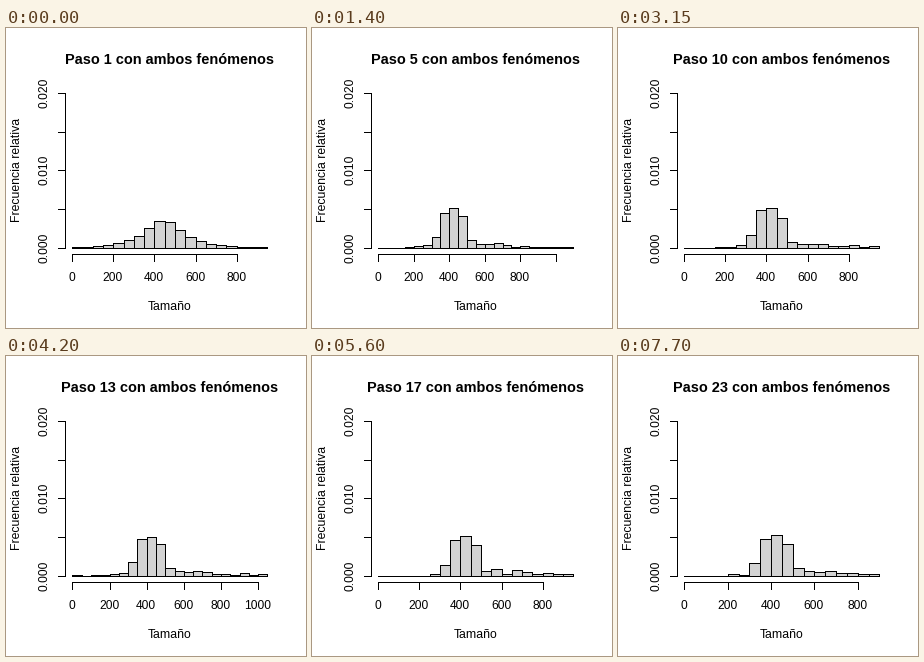
A matplotlib script for the animation above (8000 ms loop, 300x300 px).

```python
import numpy as np
import matplotlib.pyplot as plt
from matplotlib.animation import FuncAnimation
from matplotlib.patches import Rectangle

SIZE, DPI = 300, 100
TICK_MS, LOOP_MS, STEP_MS = 50, 8000, 350
STEPS = 23
PX = 72 / DPI  # one pixel in points

# Plot region, in pixels from the top left
X0, X1 = 66.84, 261.96
Y0, Y1 = 220.35, 65.24
AXIS_X, AXIS_Y, TICK = 59, 226, 7
BIN = 50

# Largest size, held from each step until the next one listed
MAX_SIZE = {1: 950, 2: 900, 4: 950, 5: 1100, 6: 950, 11: 900, 13: 1050,
            14: 950, 15: 1100, 16: 950, 21: 850, 22: 900}


def initial(x):
    return np.maximum(0, 29 / (1 + ((x - 445) / 110) ** 2) - 1)


def settled(x):
    core = 31 / (1 + ((x - 410) / 75) ** 8)
    tail = 9 * np.exp(-np.abs(x - 420) / np.where(x < 420, 100, 300))
    return core + tail


def heights(step, top):
    """Bar heights in pixels: a broad bump that settles to a narrow core."""
    x = np.arange(BIN / 2, top, BIN)
    mix = 1 - np.exp(-(step - 1) / 1.5)
    mean = initial(x) + (settled(x) - initial(x)) * mix
    noise = np.random.default_rng(step).normal(size=len(x))
    h = np.round(mean + mix * noise * np.minimum(1.2, 0.5 * np.sqrt(mean)))
    h[-1] = max(1, h[-1])
    return np.maximum(0, h)


fig = plt.figure(figsize=(SIZE / DPI, SIZE / DPI), dpi=DPI, facecolor="white")
ax = fig.add_axes([0, 0, 1, 1])
ax.set_xlim(0, SIZE)
ax.set_ylim(SIZE, 0)
ax.axis("off")


def line(xs, ys):
    return ax.plot(np.floor(xs), np.floor(ys), color="black", lw=PX,
                   antialiased=False, solid_capstyle="projecting")[0]


def text(x, y, s, size=12, **kw):
    return ax.text(x, y, s, fontsize=size * PX, family="Liberation Sans",
                   ha="center", va="baseline", rotation_mode="anchor", **kw)


def y_axis():
    line([AXIS_X, AXIS_X], [Y0, Y1])
    for i, y in enumerate(np.linspace(Y0, Y1, 5)):
        line([AXIS_X - TICK, AXIS_X], [y, y])
        if i % 2 == 0:
            text(42, y - 0.5, f"{i * 0.005:.3f}", rotation=90)


y_axis()
text(14.5, 142, "Frecuencia relativa", 12.3, rotation=90)
text(163.5, 282, "Tamaño", 12.3)
title = text(163.2, 36, "", 14.5, weight="bold")
parts = []


def draw_step(step):
    top = MAX_SIZE[max(s for s in MAX_SIZE if s <= step)]

    def px(v):
        return X0 + (X1 - X0) * v / top

    edges = np.floor(px(np.arange(0, top + 1, BIN)))
    base = np.floor(Y0)
    for left, right, height in zip(edges, edges[1:], heights(step, top)):
        bar = Rectangle((left, base - height), right - left, height, fc="#d3d3d3",
                        ec="black", lw=PX, antialiased=False, joinstyle="miter")
        parts.append(ax.add_patch(bar))

    ticks = np.arange(0, top * 1.04, 200)
    parts.append(line([X0, px(ticks[-1])], [AXIS_Y, AXIS_Y]))
    gap = px(200) - px(0)
    for v in ticks:
        parts.append(line([px(v), px(v)], [AXIS_Y, AXIS_Y + TICK]))
        if v < 1000 or gap > 36.5:  # crowded labels are dropped
            parts.append(text(px(v) - 1, 253, f"{v:.0f}"))
    title.set_text(f"Paso {step} con ambos fenómenos")


def update(i):
    while parts:
        parts.pop().remove()
    draw_step(min(STEPS, i * TICK_MS // STEP_MS + 1))
    return []


anim = FuncAnimation(fig, update, frames=LOOP_MS // TICK_MS, interval=TICK_MS,
                     init_func=lambda: update(0), repeat=True, repeat_delay=0)
plt.show()
```
